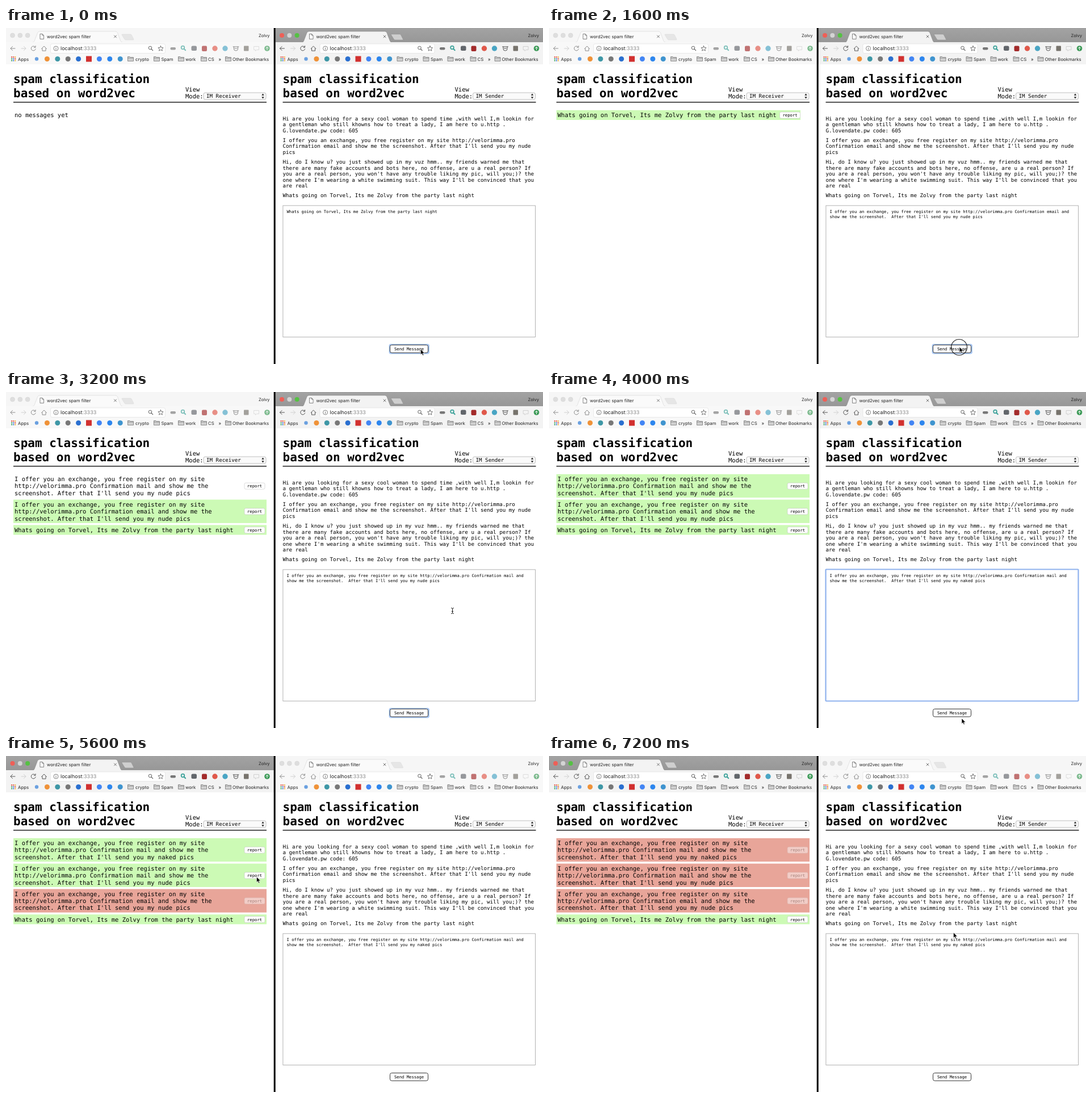
Recreate the animation shown at these times as an HTML page. Size 946 by 592 pixels, loop 8000 ms.

```html
<!DOCTYPE html>
<html lang="en">
<head>
<meta charset="utf-8">
<title>word2vec spam filter</title>
<style>
html, body { margin: 0; width: 100%; height: 100%; overflow: hidden; background: #fff; }
svg { display: block; width: 946px; height: 592px; text-rendering: geometricPrecision; }
text { white-space: pre; font-family: "DejaVu Sans Mono", monospace; }
.ui { font-family: Inter, sans-serif; }
</style>
</head>
<body>
<svg id="stage" viewBox="0 0 946 592"></svg>
<script>
const STEP = 800, PANE = 474.5;
const GREEN = '#ccfab5', RED = '#e8a599', WHITE = '#fff';

const rect = (x, y, w, h, fill, r = 0, extra = '') =>
  `<rect x="${x}" y="${y}" width="${w}" height="${h}" rx="${r}" fill="${fill}" ${extra}/>`;
const circle = (x, y, r, fill, extra = '') => `<circle cx="${x}" cy="${y}" r="${r}" fill="${fill}" ${extra}/>`;
const line = (d, color = '#5a5a5a', width = 1) =>
  `<path d="${d}" fill="none" stroke="${color}" stroke-width="${width}" stroke-linecap="round" stroke-linejoin="round"/>`;
const shape = (d, fill, extra = '') => `<path d="${d}" fill="${fill}" ${extra}/>`;
const text = (x, y, size, s, extra = '') => `<text x="${x}" y="${y}" font-size="${size}" ${extra}>${s}</text>`;
const ui = (x, y, size, s, extra = '') => text(x, y, size, s, 'class="ui" ' + extra);
const lines = (x, y, size, pitch, rows) => rows.map((s, i) => text(x, y + i * pitch, size, s)).join('');
const edge = (color, width = 1) => `stroke="${color}" stroke-width="${width}"`;

// Message wording
const PARTY = 'Whats going on Torvel, Its me Zolvy from the party last night';
const SITE = 'http://velorimma.pro';
const offer = (mail, kind) => [
  'I offer you an exchange, you free register on my site',
  `${SITE} Confirmation ${mail} and show me the`,
  `screenshot. After that I'll send you my ${kind} pics`];
const draft = (mail, kind) => [
  `I offer you an exchange, you free register on my site ${SITE} Confirmation ${mail} and`,
  `show me the screenshot.  After that I'll send you my ${kind} pics`];
const SAMPLES = [
  ['Hi are you looking for a sexy cool woman to spend time ,with well I,m lookin for',
   'a gentleman who still khowns how to treat a lady, I am here to u.http .',
   'G.lovendate.pw code: 605'],
  [`I offer you an exchange, you free register on my site ${SITE}`,
   "Confirmation email and show me the screenshot. After that I'll send you my nude",
   'pics'],
  ['Hi, do I know u? you just showed up in my vuz hmm.. my friends warned me that',
   'there are many fake accounts and bots here, no offense, are u a real person? If',
   "you are a real person, you won't have any trouble liking my pic, will you;)? the",
   "one where I'm wearing a white swimming suit. This way I'll be convinced that you",
   'are real'],
  [PARTY]];

const party = [PARTY], email = offer('email', 'nude'), mail = offer('mail', 'nude'), naked = offer('mail', 'naked');
const draftEmail = draft('email', 'nude'), draftMail = draft('mail', 'nude'), draftNaked = draft('mail', 'naked');

// One state per step: messages with colours, draft, focused control, pointer
const states = [
  { list: [], draft: party, focus: 'button', at: [730.5, 566] },
  { list: [[party, GREEN]], draft: party, focus: 'button', at: [760, 400], beam: true },
  { list: [[party, GREEN]], draft: draftEmail, focus: 'button', at: [723, 562], click: true },
  { list: [[email, GREEN], [party, GREEN]], draft: draftEmail, focus: 'button', at: [786.5, 385.5], beam: true },
  { list: [[mail, WHITE], [email, GREEN], [party, GREEN]], draft: draftMail, focus: 'button', at: [786.5, 385.5], beam: true },
  { list: [[mail, GREEN], [email, GREEN], [party, GREEN]], draft: draftNaked, focus: 'area', at: [727, 575] },
  { list: [[naked, WHITE], [mail, GREEN], [email, GREEN], [party, GREEN]], draft: draftNaked, focus: 'button', at: [427.5, 374] },
  { list: [[naked, GREEN], [mail, GREEN], [email, RED], [party, GREEN]], draft: draftNaked, left: true, at: [441.5, 213] },
  { list: [[naked, GREEN], [mail, RED], [email, RED], [party, GREEN]], draft: draftNaked, left: true, at: [441.5, 168] },
  { list: [[naked, RED], [mail, RED], [email, RED], [party, GREEN]], draft: draftNaked, left: true, at: [712.5, 311] }];

const folder = x => shape(`M${x} 50.5h3.5l1 1.2h5.5v6.6h-10z`, '#d2d2d2', edge('#777', .8)) +
  line(`M${x} 53h10`, '#777', .7);
const lens = (x, y, color, r = 2.8, w = 1) =>
  circle(x, y, r, 'none', edge(color, w)) + line(`M${x + r * .7} ${y + r * .7}l2.7 2.7`, color, w + .3);

function tabStrip(active) {
  const lights = active ? ['#ee5f57', '#d4d4d4', '#55c143'] : Array(3).fill('#dedede');
  return rect(0, 0, 472, 25, active ? 'url(#strip)' : '#f6f6f6') +
    lights.map((c, i) => circle(11.5 + i * 13.3, 13, 4, c, active ? '' : edge('#d2d2d2', .5))).join('') +
    shape('M204 12q-.3-1 1-1h14q1.600 0 2 1l4 8q.4 1-1 1h-13q-1.600 0-2-1z', active ? '#cfcfcf' : '#e6e6e6', edge(active ? '#8d8d8d' : '#d6d6d6', .5)) +
    shape('M46 25.500q3 0 4-2.500l5.500-14.500q1-2.500 3.500-2.500h134q2.500 0 3.500 2.500l5.500 14.500q1 2.500 4 2.500z',
      active ? '#f3f3f3' : '#fafafa', edge(active ? '#888' : '#d4d4d4', .6)) +
    shape('M60 10.500h4l2.500 2.500v6.500h-6.500zM64 10.500v2.500h2.500', '#fff', edge('#666', .8)) +
    ui(72, 18, 7.75, 'word2vec spam filter', 'fill="#222"') +
    line('M190.500 13l4 4m0-4l-4 4', '#666', .9) +
    ui(464.5, 16.2, 7.5, 'Zolvy', 'fill="#222" text-anchor="end"');
}

function toolbar(active) {
  const grey = active ? '#555' : '#8c8c8c';
  const extensions =
    rect(289.5, 34, 9.5, 4.5, '#777', 2) + lens(311.5, 34.5, '#3fa39b', 2.8, 1.8) +
    rect(326.5, 31.5, 9.5, 8.5, '#62666b', 2.5) + rect(345, 31.500, 9, 9.500, '#a32b2b', 2) +
    circle(368, 36, 4.7, '#e0584a') + circle(386, 36, 4.7, '#49a5c4') +
    line('M400 33h10M401.500 33v4q0 3 3.500 3t3.500-3v-4M403 36h4', '#555') +
    rect(419, 31.5, 8.500, 9, '#77736c', 1) +
    line('M437 32.500h8.500v6h-4l-2 2v-2h-2.500z', '#d0d0d0') +
    circle(460, 36, 4.8, '#3c9a57') + line('M460 38.500v-5m-2.200 2.200l2.200-2.200l2.200 2.200', '#fff');
  return rect(0, 25, 472, 39, active ? '#f3f3f3' : '#f8f8f8') +
    rect(78.5, 28, 202, 16.500, '#fff', 2.5, edge('#dcdcdc', .6)) +
    line('M16 36H8m3.500-3.500L8 36l3.500 3.500', grey) +
    line('M27 36h8m-3.500-3.500L35 36l-3.500 3.500', '#d0d0d0') +
    line('M51.500 33.500a4 4 0 1 0 .7 3.500M52 31.500v2.700h-2.700', grey) +
    line('M62.500 36.500l4.500-4.500l4.500 4.500M64 36v4.200h6V36', grey) +
    circle(88, 36, 4, 'none', edge('#666', .8)) + line('M88 35.700v2.300M88 34v.1', '#666', .9) +
    ui(96, 39.3, 9, 'localhost<tspan fill="#888">:3333</tspan>', 'fill="#222"') +
    lens(254, 35, '#666') +
    line('M272.500 31.500l1.300 3 3.300.3-2.500 2.200.8 3.200-2.900-1.700-2.900 1.700.8-3.200-2.500-2.200 3.300-.3z', '#555', .8) +
    `<g opacity="${active ? 1 : .65}">${extensions}</g>`;
}

function bookmarks() {
  const apps = ['#e5584c', '#e5584c', '#f0b43c', '#4caf6b', '#4a83dc', '#e5584c', '#4caf6b', '#4a83dc', '#f0b43c'];
  const marks = ['#6aa0e0', '#ef9238', '#3e97a6', '#777', '#2a6fd0', 'square', '#4285f4', '#2d86ee', '#3f94cf'];
  return apps.map((c, i) => rect(9 + i % 3 * 3.1, 50.2 + Math.floor(i / 3) * 3.1, 2.1, 2.1, c)).join('') +
    marks.map((c, i) => c === 'square'
      ? rect(141, 49.500, 10, 10, '#d2302f') : circle(54 + i * 18.4, 54.5, i ? 4.5 : 3.2, c)).join('') +
    [214.5, 260.5, 303.5, 343.500, 386.5].map(folder).join('') +
    [[21, 'Apps'], [228, 'crypto'], [273.500, 'Spam'], [316, 'work'], [356, 'CS'], [374.500, '»'], [399, 'Other Bookmarks']]
      .map(([x, s]) => ui(x, 57.500, 7.8, s, 'fill="#222"')).join('');
}

function header(mode) {
  return lines(13, 96.5, 21, 25, ['spam classification', 'based on word2vec'])
      .replaceAll('<text', '<text font-weight="700"') +
    lines(316, 112, 10.5, 12.4, ['View', 'Mode:']) +
    rect(13, 130, 446, 1.4, '#111') +
    rect(348, 114, 110, 12, '#fafafa', 3, edge('#b0b0b0', .8)) +
    text(353, 123, 9.2, mode) +
    shape('M450.300 118.700l2.200-3.200l2.200 3.200zM450.300 121.200l2.200 3.200l2.200-3.200z', '#222');
}

const page = (active, mode) => tabStrip(active) + toolbar(active) + bookmarks() + header(mode);

function inbox(list) {
  if (!list.length) return text(15, 156.900, 10.5, 'no messages yet');
  const width = list.length > 1 ? 446 : 430;
  let top = 144.800, out = '';
  for (const [rows, color] of list) {
    const height = rows.length > 1 ? 41.300 : 17.2, mid = top + height / 2;
    const x = 13 + width - (list.length > 1 ? 39 : 36.500), off = color === RED;
    out += rect(13, top, width, height, color) +
      lines(15, top + (rows.length > 1 ? 12.1 : 12.500), 10.5, 12.45, rows) +
      `<g opacity="${off ? .45 : 1}">` +
      rect(x, mid - 5.300, 36, 11, '#fff', 2.5, edge('#c4c4c4', .6)) +
      text(x + 5, mid + 2.700, 7.23, 'report', off ? 'fill="#555"' : '') + '</g>';
    top += height + 3.5;
  }
  return out;
}

function composer({ draft, focus }) {
  let y = 162.600, out = '';
  for (const rows of SAMPLES) {
    out += lines(487.5, y, 9.2, 10.55, rows);
    y += (rows.length - 1) * 10.55 + 17.1;
  }
  out += focus === 'area'
    ? rect(487.500, 312.5, 445, 232, '#fff', 1, edge('#8fb2ee', 2.2))
    : rect(487.900, 312.900, 444.600, 231.600, '#fff', 0, edge('#aaa', .9));
  out += lines(494.5, 326.400, 7.23, 8.4, draft);
  if (focus === 'button') out += rect(674.500, 556.500, 71.500, 18, '#a9c8f5', 4);
  return out + rect(676.5, 558.5, 67, 13.700, '#fff', 3, edge('#333', 1)) +
    text(684, 567.900, 7.23, 'Send Message');
}

function pointer({ at: [x, y], beam, click }) {
  if (beam) return line(`M${x - 2} ${y - 5}q2 0 2 1.500v7q0 1.500-2 1.500m4-10q-2 0-2 1.500m0 7q0 1.500 2 1.500M${x - 1.200} ${y + 1}h2.400`, '#222');
  return (click ? circle(x - .5, y + .5, 14, 'none', edge('#222', 1.2)) : '') +
    shape(`M${x} ${y}v9.500l2.200-2l1.500 3.500l1.600-.7l-1.500-3.400h3z`, '#000', edge('#fff', .6));
}

const DEFS = `<defs><linearGradient id="strip" x2="0" y2="1">
  <stop stop-color="#a3a3a3"/><stop offset="1" stop-color="#979797"/></linearGradient></defs>`;

const render = state => DEFS +
  page(state.left, 'IM Receiver') + inbox(state.list) +
  `<g transform="translate(${PANE})">${page(!state.left, 'IM Sender')}</g>` +
  rect(471.7, 0, 3, 592, '#000') + composer(state) + pointer(state);

const stage = document.getElementById('stage');
let shown = -1;
function tick() {
  const step = Math.floor(performance.now() / STEP) % states.length;
  if (step !== shown) stage.innerHTML = render(states[shown = step]);
  requestAnimationFrame(tick);
}
tick();
</script>
</body>
</html>
```
